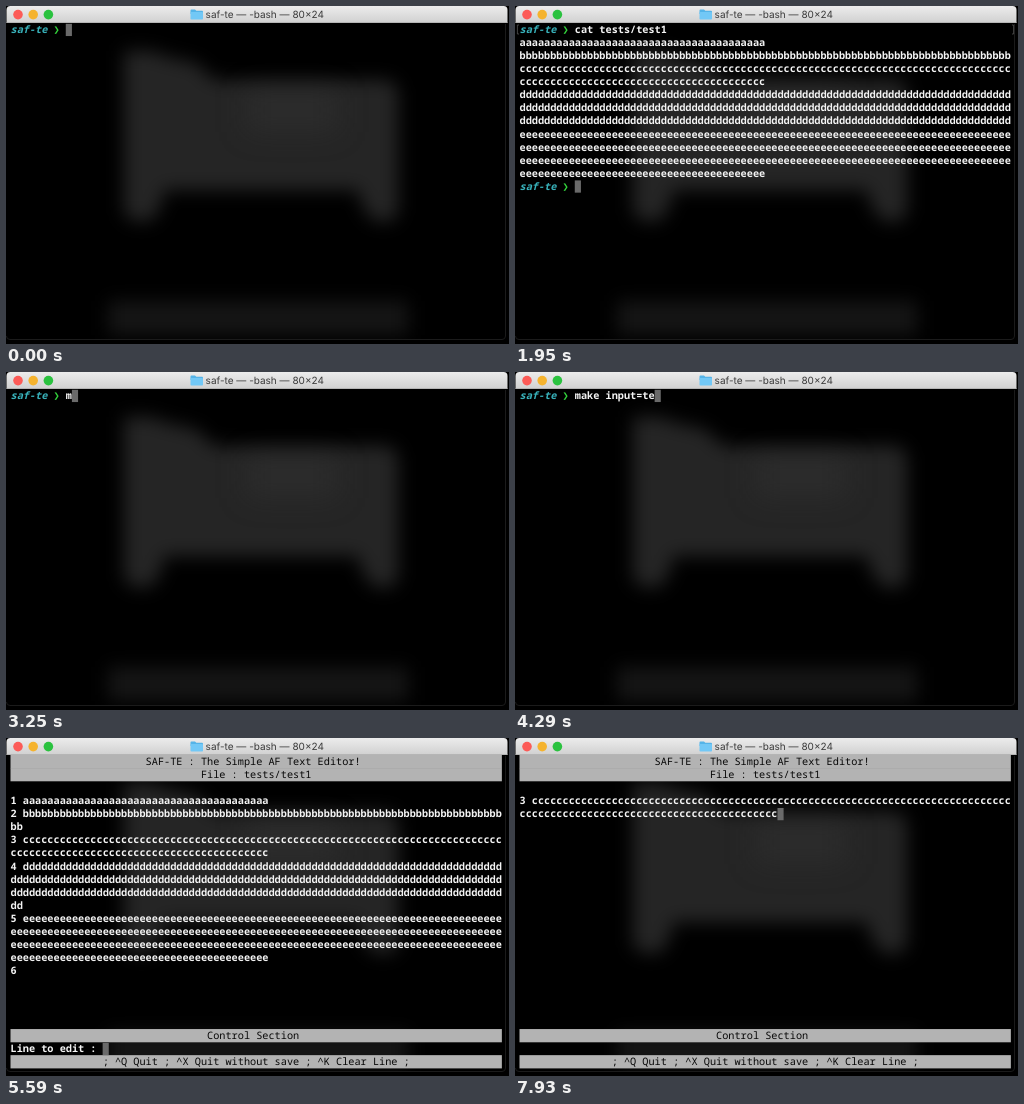
Animation, 503 px wide and 338 px high, one loop 8 s. Source, as an HTML page with a canvas:

```html
<!DOCTYPE html>
<html lang="en">
<head>
<meta charset="utf-8">
<title>Terminal text editor</title>
<style>
  html, body { margin: 0; width: 100%; height: 100%; overflow: hidden; background: #000; }
  canvas { display: block; width: 503px; height: 338px; }
</style>
</head>
<body>
<canvas id="stage"></canvas>
<script>
const WIDTH = 503, HEIGHT = 338, LOOP = 8000;
const COLS = 80, CELL_W = 6.142, ROW_H = 13.05, LEFT = 4.5, TOP = 17;
const MONO = '10.24px "Noto Sans Mono", "DejaVu Sans Mono", monospace';

const canvas = document.getElementById('stage');
const ratio = window.devicePixelRatio || 1;
canvas.width = WIDTH * ratio;
canvas.height = HEIGHT * ratio;
const ctx = canvas.getContext('2d');
ctx.scale(ratio, ratio);
ctx.textRendering = 'geometricPrecision';

const colX = col => LEFT + col * CELL_W;
const rowY = row => TOP + row * ROW_H;

function rect(x, y, w, h, color) {
  ctx.fillStyle = color;
  ctx.fillRect(x, y, w, h);
}

function print(text, row, col = 0, color = '#f4f4f4', style = 'bold') {
  ctx.font = `${style} ${MONO}`;
  ctx.fillStyle = color;
  [...text].forEach((char, i) => {
    if (char !== ' ') ctx.fillText(char, colX(col + i), rowY(row) + 10.1);
  });
}

// Prints text wrapped at the terminal width and returns the next free row.
function printWrapped(text, row) {
  for (let i = 0; i < text.length; i += COLS) print(text.slice(i, i + COLS), row++);
  return row;
}

function cursor(row, col) {
  rect(colX(col), rowY(row) + 0.8, CELL_W, ROW_H - 0.8, '#6a6a6a');
}

function drawBackdrop() {
  rect(0, 0, WIDTH, HEIGHT, '#000');
  ctx.save();
  ctx.beginPath();
  ctx.rect(0, TOP, WIDTH, 317);
  ctx.clip();
  ctx.filter = `blur(${9 * ratio}px)`;
  ctx.fillStyle = '#252525';
  ctx.fill(new Path2D(
    'M118 45 H145 L165 52 L190 57 L208 74 H380 Q392 76 392 88 V205 Q390 216 375 216 ' +
    'Q358 214 352 184 H158 Q154 214 138 216 Q118 214 118 204 Z'));
  rect(102, 295, 300, 34, '#151515');
  ctx.filter = `blur(${14 * ratio}px)`;
  rect(240, 82, 92, 44, 'rgba(60,60,60,.3)');
  ctx.restore();

  ctx.strokeStyle = '#1b1b1b';
  ctx.lineWidth = 1;
  ctx.stroke(new Path2D('M499.5 18 V330 Q499.5 333.5 496 333.5 H4 Q.5 333.5 .5 330'));
}

function drawTitleBar() {
  const shade = ctx.createLinearGradient(0, 0, 0, TOP);
  shade.addColorStop(0, '#ececec');
  shade.addColorStop(1, '#d0d0d0');
  ctx.fillStyle = shade;
  ctx.beginPath();
  ctx.roundRect(0.5, 0, 501, TOP, [4, 4, 0, 0]);
  ctx.fill();
  rect(0.5, TOP - 0.7, 501, 0.7, '#a9a9a9');

  ['#fc5b57', '#f5b32e', '#2ac23f'].forEach((color, i) => {
    ctx.fillStyle = color;
    ctx.beginPath();
    ctx.arc(12 + 15.2 * i, 8.6, 4.8, 0, 2 * Math.PI);
    ctx.fill();
  });

  ctx.fillStyle = '#55b4e8';
  ctx.fill(new Path2D('M184.5 4.5 Q184.5 3.6 185.4 3.6 H189 L190.3 4.8 H196 Q197 4.8 197 5.8 V8 H184.5 Z'));
  ctx.fillStyle = '#72c8f6';
  ctx.beginPath();
  ctx.roundRect(184.5, 6, 12.5, 7.5, 0.8);
  ctx.fill();

  ctx.font = '10px Inter, Roboto, sans-serif';
  ctx.fillStyle = '#3b3b3b';
  ctx.fillText('saf-te — -bash — 80×24', 199.6, 12.2);
}

function prompt(row, command, submitted = false) {
  print('saf-te', row, 0, '#38b2bb', 'italic bold');
  print('❯', row, 7, '#33d63c');
  print(command, row, 9);
  if (!submitted) return cursor(row, 9 + command.length);
  const top = rowY(row) + 2, bottom = top + 9;
  ctx.strokeStyle = '#555';
  ctx.lineWidth = 0.8;
  ctx.stroke(new Path2D(
    `M4 ${top} H2.4 V${bottom} H4 M497 ${top} H498.6 V${bottom} H497`));
}

function banner(text, row) {
  rect(LEFT, rowY(row), COLS * CELL_W, ROW_H + 0.2, '#b3b3b3');
  print(text, row, Math.floor((COLS - text.length) / 2), '#080808', 'normal');
}

const fileLines = [['a', 40], ['b', 80], ['c', 120], ['d', 240], ['e', 280]]
  .map(([char, count]) => char.repeat(count));
const numbered = [...fileLines, ''].map((line, i) => `${i + 1} ${line}`);

function editorFrame() {
  banner('SAF-TE : The Simple AF Text Editor!', 0);
  banner('File : tests/test1', 1);
  banner('Control Section', 21);
  banner('; ^Q Quit ; ^X Quit without save ; ^K Clear Line ;', 23);
}

const scenes = {
  shell(typed) {
    prompt(0, typed);
  },
  listing(typed) {
    prompt(0, 'cat tests/test1', true);
    prompt(fileLines.reduce((row, line) => printWrapped(line, row), 1), typed);
  },
  build() {
    prompt(0, 'make input=tests/test1', true);
    print('cc -o te -I./include/ -Wall ./src/main.c ./src/safte.c ./src/op.c', 1);
    cursor(2, 0);
  },
  overview(typed) {
    editorFrame();
    numbered.reduce((row, line) => printWrapped(line, row), 3);
    const label = 'Line to edit : ' + typed;
    print(label, 22);
    cursor(22, label.length);
  },
  editLine() {
    editorFrame();
    printWrapped(numbered[2], 3);
    cursor(4, numbered[2].length - COLS);
  }
};

// [start in ms, scene, typed text]
const steps = [
  [0, 'shell', ''],
  [390, 'shell', 'c'],
  [650, 'shell', 'ca'],
  [780, 'shell', 'cat'],
  [910, 'shell', 'cat '],
  [1040, 'shell', 'cat te'],
  [1170, 'shell', 'cat tes'],
  [1300, 'shell', 'cat tests/'],
  [1430, 'shell', 'cat tests/te'],
  [1690, 'shell', 'cat tests/test1'],
  [1820, 'listing', ''],
  [2340, 'listing', 'c'],
  [2600, 'listing', 'cl'],
  [2730, 'listing', 'cle'],
  [2860, 'listing', 'clea'],
  [2990, 'listing', 'clear'],
  [3120, 'shell', ''],
  [3250, 'shell', 'm'],
  [3380, 'shell', 'mak'],
  [3640, 'shell', 'make '],
  [3770, 'shell', 'make in'],
  [3900, 'shell', 'make inpu'],
  [4030, 'shell', 'make input'],
  [4160, 'shell', 'make input='],
  [4290, 'shell', 'make input=te'],
  [4420, 'shell', 'make input=tes'],
  [4550, 'shell', 'make input=tests/'],
  [4680, 'shell', 'make input=tests/te'],
  [4810, 'shell', 'make input=tests/test'],
  [4940, 'shell', 'make input=tests/test1'],
  [5200, 'build', ''],
  [5590, 'overview', ''],
  [7540, 'overview', '3'],
  [7800, 'editLine', '']
];

let shown = null;
const startTime = performance.now();

function render(now) {
  const time = Math.max(0, now - startTime) % LOOP;
  const step = steps.findLast(([start]) => start <= time);
  if (step !== shown) {
    shown = step;
    drawBackdrop();
    drawTitleBar();
    scenes[step[1]](step[2]);
  }
  requestAnimationFrame(render);
}
render(startTime);
</script>
</body>
</html>
```
